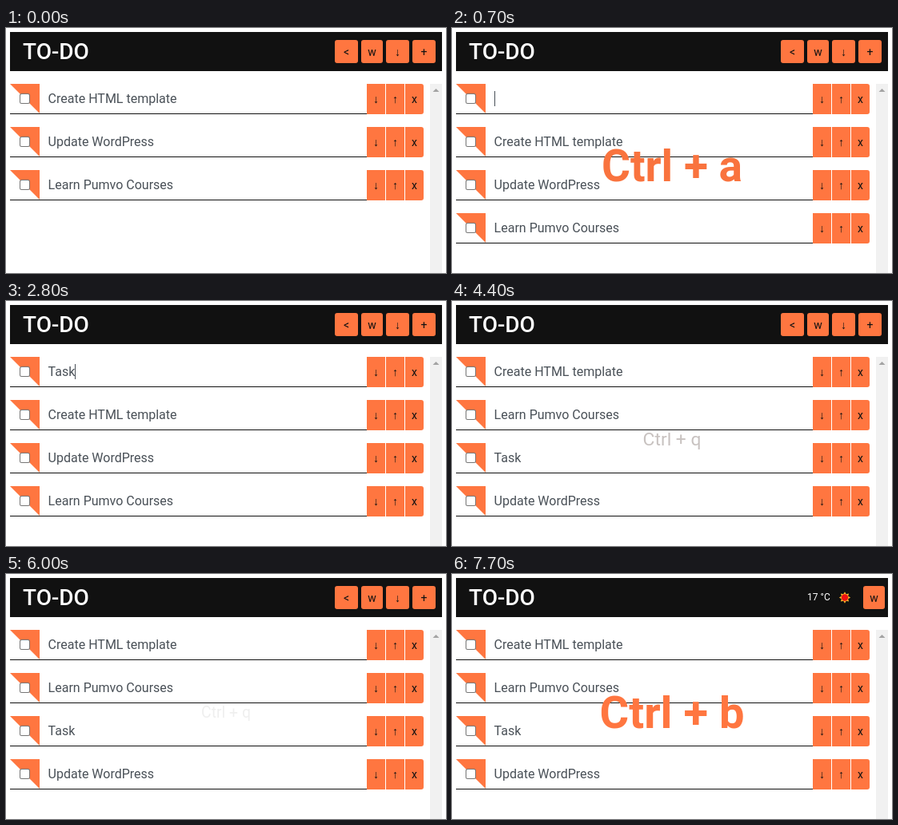
Recreate the animation shown at these times as an HTML page with a canvas. Size 550x307 px, loop 8 s.

```html
<!DOCTYPE html>
<html lang="en">
<head>
<meta charset="utf-8">
<title>To-do list</title>
<style>
html, body { margin: 0; width: 550px; height: 307px; overflow: hidden; background: #fff; }
canvas { display: block; width: 550px; height: 307px; }
</style>
</head>
<body>
<canvas id="stage"></canvas>
<script>
const W = 550, H = 307, LOOP = 8000, STEP = 100;
const ORANGE = '#ff7640', INK = '#111';
const SANS = 'Roboto, "Liberation Sans", sans-serif';
const ARROWS = '"Liberation Sans", Arial, sans-serif';
const CREATE = 'Create HTML template', UPDATE = 'Update WordPress', LEARN = 'Learn Pumvo Courses';

const canvas = document.getElementById('stage');
const ratio = window.devicePixelRatio || 1;
canvas.width = W * ratio;
canvas.height = H * ratio;
const ctx = canvas.getContext('2d');
ctx.scale(ratio, ratio);

// Shortcut hints: when they open, when they close, and their size per step
const GROW = [0.17, 0.72, 0.975, 1];
const HINTS = [
  { label: 'Ctrl + a', from: 500, to: 2100, shrink: [0.9, 0.45, 0.085, 0] },
  { label: 'Ctrl + q', from: 4400, to: 5900, shrink: [0.55, 0.085], end: 7400 },
  { label: 'Ctrl + b', from: 7400, to: LOOP, shrink: [0] }
];

// Typing: [time, letters shown, caret visible]
const TYPING = [
  [500, 0, true], [1100, 0, false], [1900, 1, true], [2200, 2, true],
  [2400, 3, true], [2800, 4, true], [3400, 4, false], [4000, 4, true]
];

function rect(x, y, w, h, color, radius = 0) {
  ctx.fillStyle = color;
  ctx.beginPath();
  ctx.roundRect(x, y, w, h, radius);
  ctx.fill();
}

function poly(points, color) {
  ctx.fillStyle = color;
  ctx.beginPath();
  points.forEach(([x, y]) => ctx.lineTo(x, y));
  ctx.fill();
}

function text(str, x, y, size, color, { weight = 400, align = 'left', family = SANS } = {}) {
  ctx.font = `${weight} ${size}px ${family}`;
  ctx.textAlign = align;
  ctx.fillStyle = color;
  ctx.fillText(str, x, y);
}

function button(label, x, y, w, h, radius) {
  rect(x, y, w, h, ORANGE, radius);
  const family = '↓↑'.includes(label) ? ARROWS : SANS;
  text(label, x + w / 2, y + h / 2 + 5, 14, INK, { align: 'center', family });
}

function sun(cx, cy) {
  const rays = Array.from({ length: 16 }, (_, i) => {
    const r = i % 2 ? 4.5 : 7.2, a = i * Math.PI / 8;
    return [cx + r * Math.cos(a), cy + r * Math.sin(a)];
  });
  poly(rays, '#f8b52c');
  ctx.fillStyle = '#f01010';
  ctx.beginPath();
  ctx.arc(cx, cy, 4.2, 0, 2 * Math.PI);
  ctx.fill();
}

function header(weather) {
  rect(5, 5, 540, 49, INK);
  text('TO-DO', 21, 39, 28, '#fff', { weight: 500 });
  if (weather) {
    text('17 °C', 444, 33, 12, '#fff');
    sun(491, 29.5);
    button('w', 514, 15, 27, 29, 3);
    return;
  }
  button('<', 411, 15, 29, 29, 3);
  button('w', 444, 15, 27, 29, 3);
  button('↓', 475, 15, 29, 29, 3);
  button('+', 508, 15, 29, 29, 3);
}

function row(label, y) {
  poly([[5, y], [42, y], [42, y + 37]], ORANGE);
  rect(5, y + 37, 446, 1, INK);
  rect(17, y + 12, 13, 13, '#767676', 2.5);
  rect(18, y + 13, 11, 11, '#fff', 1.5);
  text(label, 52.6, y + 24, 16, '#495057');
  button('↓', 451, y, 23, 38);
  button('↑', 475, y, 23, 38);
  button('x', 499, y, 23, 38, [0, 3, 3, 0]);
}

function caret(label) {
  ctx.font = `400 16px ${SANS}`;
  rect(Math.round(52.6 + ctx.measureText(label).width), 79, 1, 19, '#495057');
}

function scrollbar() {
  rect(530, 70, 15, H - 70, '#f1f1f1');
  poly([[533.5, 80], [537.5, 76], [541.5, 80]], '#a3a3a3');
}

function hintLevel({ from, to, shrink, end = LOOP }, t) {
  if (t < from || t >= end) return 0;
  const [levels, start] = t < to ? [GROW, from] : [shrink, to];
  return levels[Math.min(Math.floor((t - start) / STEP), levels.length - 1)];
}

function hint(label, p) {
  if (!p) return;
  const size = 16 + 40 * p;
  const mix = [255, 118, 64].map(c => Math.round(c * p));
  ctx.globalAlpha = Math.min(1, 9 * p * p);
  text(label, W / 2, 173.4 + 0.342 * size, size, `rgb(${mix})`,
    { weight: p > 0.4 ? 700 : 400, align: 'center' });
  ctx.globalAlpha = 1;
}

function draw(t) {
  rect(0, 0, W, H, '#fff');
  header(t >= 7400);
  scrollbar();

  let items = [CREATE, UPDATE, LEARN], typed = null;
  if (t >= 4400) {
    items = [CREATE, LEARN, 'Task', UPDATE];
  } else if (t >= 500) {
    const [, count, shown] = TYPING.filter(k => k[0] <= t).pop();
    const label = 'Task'.slice(0, count);
    items.unshift(label);
    if (shown) typed = label;
  }
  items.forEach((label, i) => row(label, 70 + 54 * i));
  if (typed !== null) caret(typed);

  HINTS.forEach(h => hint(h.label, hintLevel(h, t)));
}

const begin = performance.now();
function tick() {
  draw((performance.now() - begin) % LOOP);
  requestAnimationFrame(tick);
}
tick();
</script>
</body>
</html>
```
